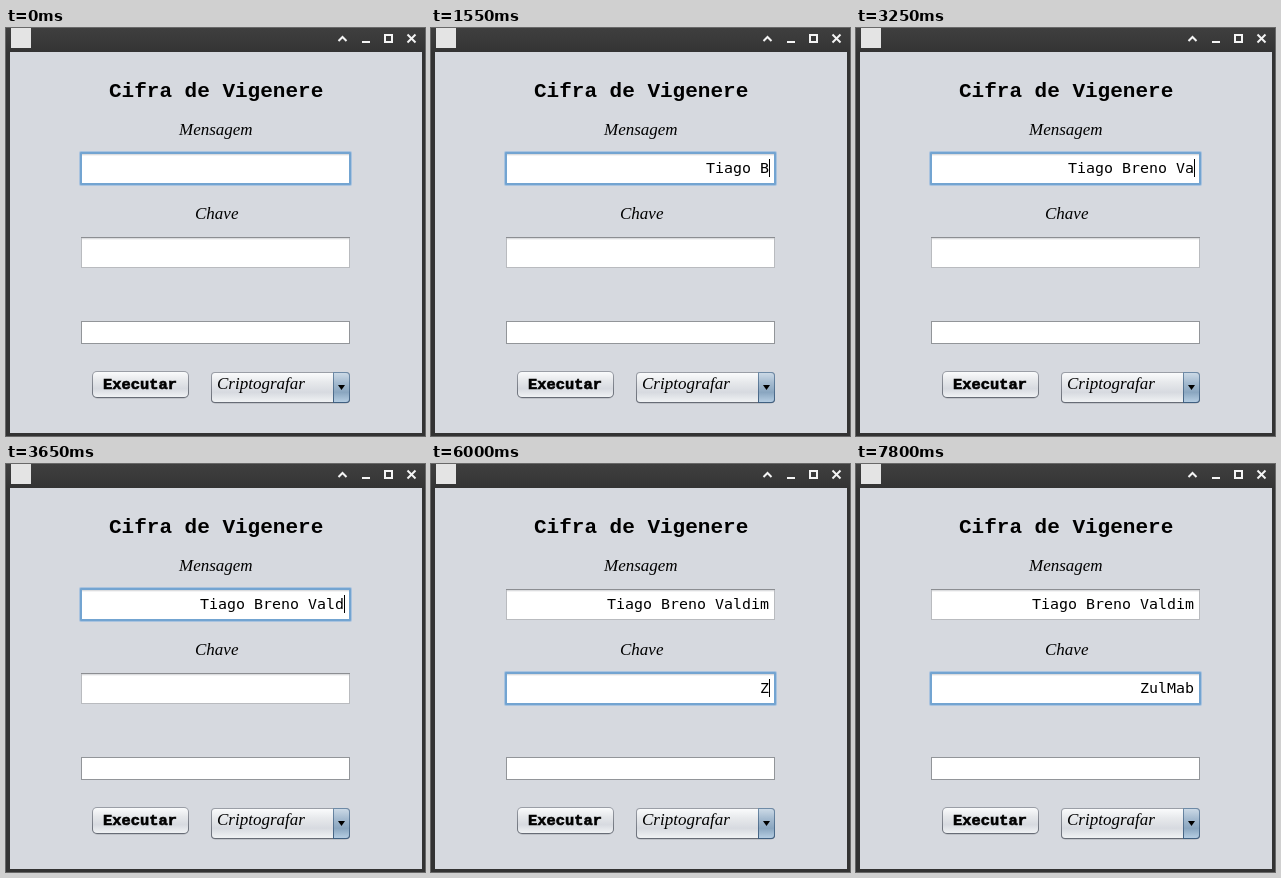
Recreate the animation shown at these times as an HTML page with a canvas. Size 419x408 px, loop 8 s.

```html
<!DOCTYPE html>
<html lang="pt">
<head>
<meta charset="utf-8">
<title>Cifra</title>
<style>
html, body { margin: 0; width: 100%; height: 100%; overflow: hidden; background: #333; }
canvas { display: block; }
</style>
</head>
<body>
<canvas id="stage" width="419" height="408"></canvas>
<script>
const ctx = document.getElementById('stage').getContext('2d');
const LOOP = 8000;
const BLACK = '#000';
const MONO = '14.95px "DejaVu Sans Mono", monospace';
const SCRIPT = 'italic 17px "Liberation Serif", serif';
const TYPEWRITER = '"Liberation Mono", monospace';

const MESSAGE = 'Tiago Breno Valdim';
const KEY = 'ZulMab';
const MESSAGE_TIMES = [350, 500, 650, 800, 950, 1100, 1550, 1750, 1950,
  2100, 2300, 2500, 2900, 3250, 3400, 3550, 3700, 3850];
const KEY_TIMES = [6000, 6300, 6450, 6850, 7000, 7200];
const CARET_TOGGLES = [50, 4450, 4850, 5150, 5200, 5750, 6000, 7800];
const BLUR = 5150, FOCUS = 5200;

const passed = (times, t) => times.filter(at => at <= t).length;

function rect(x, y, w, h, fill) {
  ctx.fillStyle = fill;
  ctx.fillRect(x, y, w, h);
}

function round(x, y, w, h, r, fill) {
  ctx.beginPath();
  ctx.roundRect(x, y, w, h, r);
  ctx.fillStyle = fill;
  ctx.fill();
}

function fade(y0, y1, ...colors) {
  const g = ctx.createLinearGradient(0, y0, 0, y1);
  colors.forEach((c, i) => g.addColorStop(i / (colors.length - 1), c));
  return g;
}

function text(str, x, y, font) {
  ctx.font = font;
  ctx.fillStyle = BLACK;
  ctx.fillText(str, x, y);
}

function line(points, color, width) {
  ctx.beginPath();
  points.forEach(([x, y]) => ctx.lineTo(x, y));
  ctx.strokeStyle = color;
  ctx.lineWidth = width;
  ctx.stroke();
}

function drawWindow() {
  rect(0, 0, 419, 408, '#333333');
  rect(0, 0, 419, 24, fade(0, 24, '#3f3f3f', '#343434'));
  rect(4, 24, 412, 381, '#d6d9df');
  rect(5, 0, 20, 20, '#e4e4e4');

  const white = '#f4f4f4';
  line([[332.5, 13], [336.5, 9], [340.5, 13]], white, 2);
  rect(356, 13, 8, 2, white);
  ctx.strokeRect(379, 7, 7, 7);
  line([[401.5, 6.5], [409.5, 14.5]], white, 2);
  line([[409.5, 6.5], [401.5, 14.5]], white, 2);
}

function drawLabels() {
  text('Cifra de Vigenere', 103, 69, 'bold 21px ' + TYPEWRITER);
  text('Mensagem', 173, 107, SCRIPT);
  text('Chave', 189, 191, SCRIPT);
}

function drawField(y, h, focused, value) {
  if (focused) {
    round(73, y - 2, 273, h + 4, 2, '#a9c3df');
    round(74, y - 1, 271, h + 2, 1, '#73a4d1');
  } else {
    rect(75, y, 269, h, '#b9bbbf');
    rect(75, y, 269, 1, '#8c8e92');
  }
  rect(76, y + 1, 267, h - 2, '#fff');
  rect(76, y + 1, 267, 1, '#dcdddf');
  rect(76, y + 2, 267, 1, '#f3f3f4');
  text(value, 338 - 9 * value.length, y + 20, MONO);
}

function drawResult() {
  rect(75, 293, 269, 23, '#929599');
  rect(76, 294, 267, 21, '#fff');
}

function drawControls() {
  round(86, 344, 97, 27, 6, '#bfc2c8');
  round(86, 343, 97, 27, 5, fade(343, 370, '#9b9fa7', '#666b75'));
  round(87, 344, 95, 25, 4, fade(344, 369, '#fafbfc', '#e6e8eb', '#d7dae0', '#f0f2f4'));
  text('Executar', 97, 361, 'bold 15.4px ' + TYPEWRITER);
  ctx.strokeStyle = BLACK;
  ctx.lineWidth = 0.6;
  ctx.strokeText('Executar', 97, 361);

  round(205, 345, 139, 31, 5, '#bfc2c8');
  round(205, 344, 139, 31, 4, fade(344, 375, '#9b9fa7', '#666b75'));
  round(206, 345, 121, 29, [3, 0, 0, 3], fade(345, 374, '#fafbfc', '#e6e8eb', '#d7dae0', '#f0f2f4'));
  round(327, 344, 17, 31, [0, 4, 4, 0], fade(344, 375, '#6f8ba7', '#3f5f80'));
  round(328, 345, 15, 29, [0, 3, 3, 0], fade(345, 374, '#cbd9e6', '#a5bbd0', '#8aa6c0', '#b5cde2'));
  text('Criptografar', 211, 361, SCRIPT);

  ctx.beginPath();
  ctx.moveTo(332, 357);
  ctx.lineTo(339, 357);
  ctx.lineTo(335.5, 362);
  ctx.fill();
}

function draw(t) {
  const message = MESSAGE.slice(0, passed(MESSAGE_TIMES, t));
  const key = KEY.slice(0, passed(KEY_TIMES, t));
  drawWindow();
  drawLabels();
  drawField(125, 31, t < BLUR, message);
  drawField(209, 31, t >= FOCUS, key);
  drawResult();
  drawControls();
  if (passed(CARET_TOGGLES, t) % 2) rect(338, t < BLUR ? 131 : 215, 1, 18, BLACK);
}

const start = performance.now();
function tick() {
  draw((performance.now() - start) % LOOP);
  requestAnimationFrame(tick);
}
tick();
</script>
</body>
</html>
```
